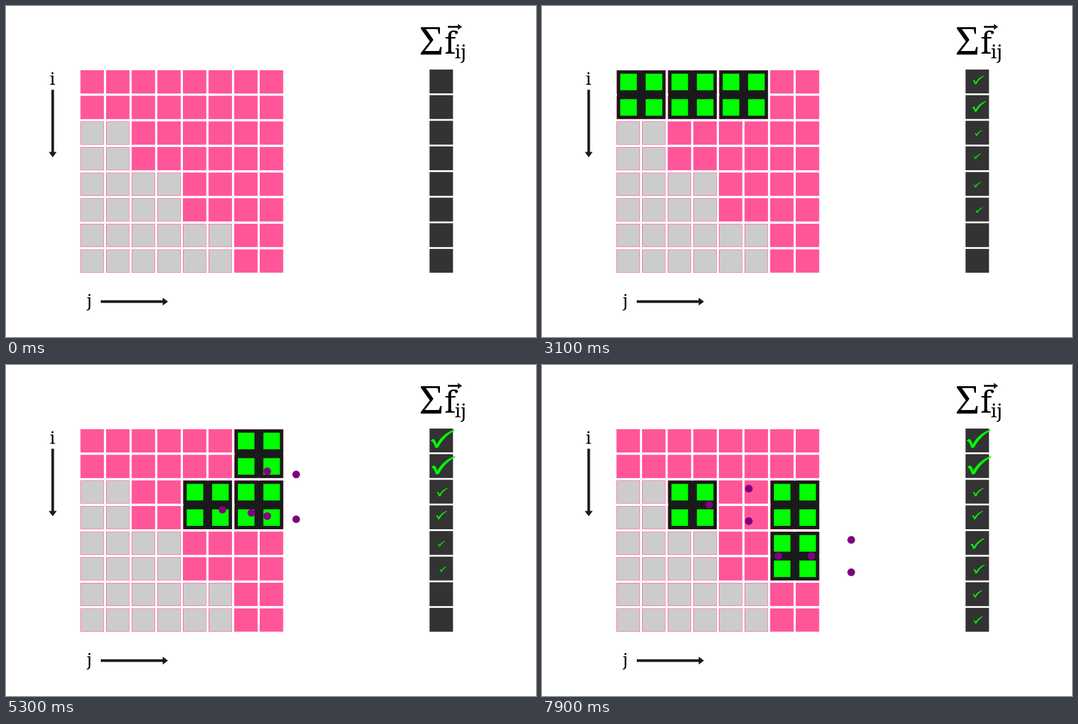
An HTML page that plays this animation: 800x500 px, repeating every 8 s.

```html
<!DOCTYPE html>
<html lang="en">
<head>
<meta charset="utf-8">
<title>Pairwise force tiles</title>
<style>
  html, body { margin: 0; width: 100%; height: 100%; overflow: hidden; background: #fff; }
  svg { display: block; width: 800px; height: 500px; }
  text { font-family: "Noto Serif", "DejaVu Serif", serif; fill: #000; }
  .sum { font-family: "Liberation Serif", "Times New Roman", serif; }
</style>
</head>
<body>
<svg id="stage" viewBox="0 0 800 500">
  <g id="grid"></g>
  <g id="column"></g>
  <g fill="none" stroke="#1a1a1a" stroke-width="4">
    <path d="M70.5 126.500V221M143 446.500H237"/>
    <path d="M667 31.500H684" stroke-width="3"/>
  </g>
  <path fill="#1a1a1a" d="M64.500 220.500H76.500L70.500 228.500ZM236.500 440.500V452.500L244.500 446.500ZM682 27V36L688.500 31.500Z"/>
  <text x="66" y="118.500" font-size="26">i</text>
  <text x="122" y="454" font-size="26">j</text>
  <text class="sum" x="623.500" y="74" font-size="64">Σ</text>
  <text x="662" y="71.500" font-size="46">f</text>
  <text x="677.500" y="79" font-size="28">ij</text>
  <g id="checks"></g>
  <g id="tiles"></g>
  <g id="dots"></g>
</svg>
<script>
const LOOP = 8000, STEP = 100, SPEED = 0.85, SUM_X = 657;
const PITCH = 38.66, BLOCK = 2 * PITCH;
const CHECK = 'M-17.5 2.500C-15.5 .5-14-.5-12.500 0C-11 .8-10 4-8.500 8' +
  'C-4-1 6-11 18.500-14.500L18-12.500C8-7-1 2-6 12.500L-10.500 13.500C-12 8-13.500 4-17.500 2.500Z';

// Tiles are [block row, block column, sides that send a dot].
const stages = [
  { start: 1100, send: 2400, arrive: 3000, leave: 3100,
    tiles: [[0, 0, 'tblr'], [0, 1, 'tblr'], [0, 2, 'tblr']] },
  { start: 3900, send: 5200, arrive: 6000, leave: 6200,
    tiles: [[0, 3, 'tblr'], [1, 2, 'tblr'], [1, 3, 'tblr']] },
  { start: 7100, send: 8400, arrive: 9000, leave: 9200,
    tiles: [[1, 1, 'tbr'], [1, 3, ''], [2, 3, 'tblr']] }
];

// Tick marks: centre, then the width after each time in growth.
const growth = [[2300, 2500], [2900, 3100], [5000, 5200], [6000, 6200]];
const ticks = [
  [658.5, 112, 14, 17, 36, 36],
  [659.5, 152, 16, 21, 36, 36],
  [658.5, 192, 0, 11, 17, 17],
  [657, 227, 0, 11, 16.5, 16.5],
  [657, 270, 0, 11, 11, 21],
  [659.5, 308.5, 0, 11, 11, 17.5],
  [657, 346, 0, 0, 0, 14],
  [658, 385.5, 0, 0, 0, 14]
];

const $ = id => document.getElementById(id);
const clamp = v => Math.max(0, Math.min(1, v));
const mix = (a, b, p) => a + (b - a) * p;

function add(parent, tag, attrs) {
  const el = document.createElementNS('http://www.w3.org/2000/svg', tag);
  for (const k in attrs) el.setAttribute(k, attrs[k]);
  return parent.appendChild(el);
}
function box(parent, x, y, w, h, fill) {
  return add(parent, 'rect', { x, y, width: w, height: h, fill });
}

for (let r = 0; r < 8; r++) {
  for (let c = 0; c < 8; c++) {
    const x = 112.4 + c * PITCH, y = 97 + r * PITCH;
    box($('grid'), x, y, 35.4, 35.2, '#ff5599');
    if (c >> 1 < r >> 1) box($('grid'), x + 0.8, y + 0.6, 34, 34, '#cccccc');
  }
  box($('column'), 639.3, 96 + r * 38.7, 35.4, 36, '#333333');
}

const marks = ticks.map(() => add($('checks'), 'path', { d: CHECK, fill: '#00ff00' }));

for (const s of stages) {
  s.group = add($('tiles'), 'g', {});
  s.spots = s.tiles.map(([r, c, sides]) => {
    const x = 149.8 + c * BLOCK, y = 134 + r * BLOCK;
    box(s.group, x - 36.7, y - 36.7, 73.4, 73.4, '#1a1a1a');
    for (const dx of [-1, 1])
      for (const dy of [-1, 1])
        box(s.group, x + dx * 19.2 - 12.5, y + dy * 19.2 - 12.5, 25, 25, '#00ff00');
    return { x, y, c, sides };
  });
}

const pool = Array.from({ length: 24 }, () => add($('dots'), 'circle', { r: 5.8, fill: '#800080' }));

function dotsOf(s, t) {
  const out = [], age = t - s.start;
  if (age < 300) return out;
  const join = clamp((age - 200) / 500);
  for (const { x, y, c, sides } of s.spots) {
    for (const side of sides) {
      const sign = 'tl'.includes(side) ? -1 : 1, row = 'tb'.includes(side);
      const ex = x + (row ? 0 : sign * 25), ey = y + (row ? sign * 24.5 : 0);
      if (join < 1) {
        // Two neighbouring squares each send a dot to the shared gap.
        for (const k of [-1, 1]) {
          const sx = x + 19.2 * (row ? k : sign), sy = y + 19.2 * (row ? sign : k);
          out.push([mix(sx, ex, join), mix(sy, ey, join)]);
        }
      } else if (row) {
        const px = ex + SPEED * (age - 700);
        if (px < SUM_X) out.push([px, ey]);
      } else {
        const p = clamp((t - s.send) / (s.arrive - s.send));
        const slot = 2 * c + (sign > 0 ? 1 : 0);
        if (p < 1) out.push([mix(ex, SUM_X, p), mix(ey, 114 + slot * 38.7, p)]);
      }
    }
  }
  return out;
}

function draw(t) {
  let dots = [];
  for (const s of stages) {
    const shown = clamp((t - s.start + STEP) / 300) * clamp(1 - (t - s.leave) / 300);
    s.group.setAttribute('opacity', shown);
    if (shown > 0) dots = dots.concat(dotsOf(s, t));
  }
  pool.forEach((el, i) => {
    const d = dots[i];
    el.setAttribute('visibility', d ? 'visible' : 'hidden');
    if (d) { el.setAttribute('cx', d[0]); el.setAttribute('cy', d[1]); }
  });
  ticks.forEach(([x, y, ...sizes], i) => {
    let size = 0;
    growth.forEach(([a, b], k) => { size = mix(size, sizes[k], clamp((t - a) / (b - a))); });
    marks[i].setAttribute('visibility', size > 0 ? 'visible' : 'hidden');
    marks[i].setAttribute('transform', `translate(${x} ${y}) scale(${size / 36})`);
  });
}

const begin = performance.now();
function frame() {
  const t = (performance.now() - begin) % LOOP;
  draw(Math.floor(t / STEP) * STEP);
  requestAnimationFrame(frame);
}
frame();
</script>
</body>
</html>
```
